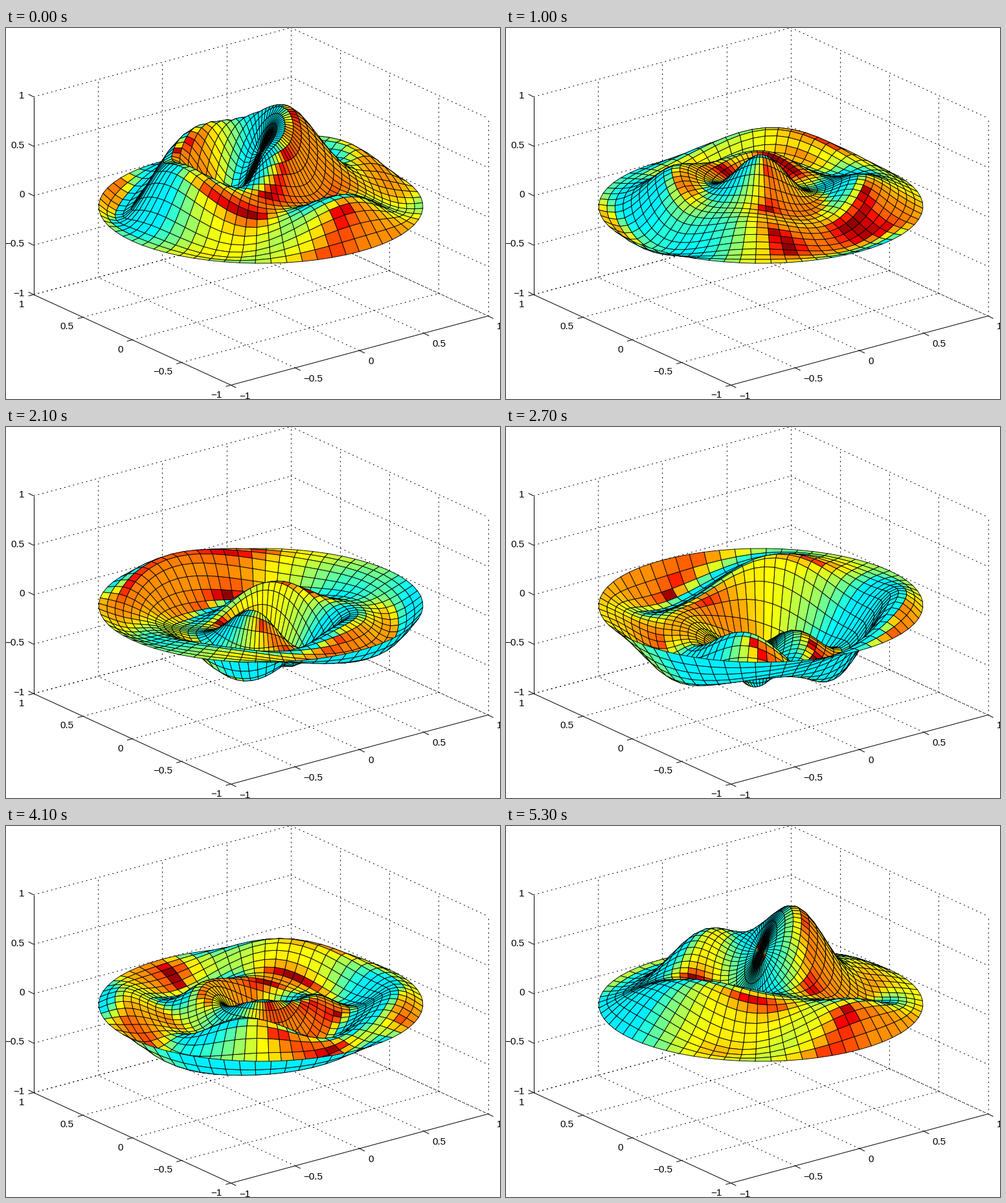
Recreate the animation shown at these times as a matplotlib script. Size 763x574 px, loop 5400 ms.

```python
import numpy as np
import matplotlib.pyplot as plt
from matplotlib.animation import FuncAnimation
from matplotlib.collections import PolyCollection

W, H, DPI = 763, 574, 64
PX = 72 / DPI                      # one pixel in points
FRAMES, STEP_MS = 54, 100
RINGS, SPOKES = 20, 64
SPIN = np.radians(37.4)            # turn of the x axis on screen

plt.rcParams["font.family"] = "Liberation Sans"

# ---------- projection ----------
ORIGIN = np.array([393.6, 276.0])
X_AXIS = np.array([198.6, -53.5])
Y_AXIS = np.array([-152.4, -70.0])
Z_AXIS = np.array([0.0, -153.0])
WIDE, DEEP = 250.4, 88.1


def project(x, y, z):
    return ORIGIN + x * X_AXIS + y * Y_AXIS + z * Z_AXIS


# ---------- drum ----------
def bessel(m, x):
    tau = (np.arange(200) + 0.5) * np.pi / 200
    return np.cos(m * tau - np.asarray(x)[..., None] * np.sin(tau)).mean(-1)


def bessel_zero(m, n):
    x = np.linspace(0.5, 20, 2000)
    y = bessel(m, x)
    i = np.flatnonzero(y[:-1] * y[1:] < 0)[n - 1]
    return x[i] - y[i] * (x[i + 1] - x[i]) / (y[i + 1] - y[i])


radius = np.linspace(0, 1, RINGS + 1)
phi = np.linspace(0, 2 * np.pi, SPOKES + 1) + SPIN
R, PHI = np.meshgrid(radius, phi, indexing="ij")
U, V = R * np.cos(PHI), R * np.sin(PHI)
BASE = bessel_zero(0, 1)           # the lowest tone swings once per loop


class Mode:
    """Standing wave: m nodal lines, n nodal circles, highest at step `peak`."""

    def __init__(self, m, n, size, facing=0, peak=0):
        zero = bessel_zero(m, n)
        turn = PHI - np.radians(facing)
        self.shape = size * bessel(m, zero * R) * np.cos(m * turn)
        self.speed = 2 * np.pi / FRAMES * zero / BASE
        self.peak = peak

    def at(self, k):
        return self.shape * np.cos(self.speed * (k - self.peak))


MODES = [
    Mode(0, 1, 0.57, peak=2),
    Mode(1, 2, 0.40, facing=55, peak=-2),
    Mode(1, 3, 0.55, facing=20),
    Mode(1, 4, 0.40, facing=90, peak=26),
    Mode(2, 3, 0.35, peak=6),
    Mode(3, 2, 0.25, facing=17),
    Mode(4, 1, 0.25, facing=-50),
]


def heights(k):
    return sum(mode.at(k) for mode in MODES)


# ---------- lighting ----------
VIEW = np.array([0, -np.sqrt(3) / 2, 0.5])
LIGHT = np.array([np.sqrt(6) / 4, -np.sqrt(6) / 4, 0.5])
AMBIENT, DIFFUSE, SPECULAR, SHINE = 0.55, 0.6, 0.4, 10


def jet64(level):
    def ramp(middle):
        return np.clip(1.5 - np.abs(level - middle) / 16, 0, 1)
    return np.stack([ramp(48), ramp(32), ramp(16)], -1)


def nice_span(z):
    """Length of a rounded axis range around the data."""
    lo, hi = z.min(), z.max()
    raw = (hi - lo) / 4
    power = 10 ** np.floor(np.log10(raw))
    step = power * min((1, 2, 5, 10), key=lambda n: abs(np.log(n * power / raw)))
    return (np.ceil(hi / step) - np.floor(lo / step + 1e-3)) * step


def shade(z):
    z = z * 2 / nice_span(z)
    zr = np.gradient(z, radius, axis=0)
    ring = np.concatenate([z[:, -2:-1], z, z[:, 1:2]], axis=1)
    zp = (ring[:, 2:] - ring[:, :-2]) / (4 * np.pi / SPOKES)
    zp = zp / np.maximum(R, radius[1] / 2)
    normal = np.stack([zp * np.sin(PHI) - zr * np.cos(PHI),
                       -zr * np.sin(PHI) - zp * np.cos(PHI),
                       np.ones_like(z)], -1)
    normal /= np.linalg.norm(normal, axis=-1, keepdims=True)
    lit, seen = normal @ LIGHT, normal @ VIEW
    gloss = np.maximum(0, 2 * lit * seen - LIGHT @ VIEW) ** SHINE
    total = AMBIENT + DIFFUSE * np.maximum(0, lit) + SPECULAR * gloss
    bright = total / (AMBIENT + DIFFUSE + SPECULAR)
    return jet64(np.clip(np.floor(bright * 64) + 1, 1, 64))


def corners(a):
    return np.stack([a[:-1, :-1], a[1:, :-1], a[1:, 1:], a[:-1, 1:]], 2)


# ---------- stage ----------
fig = plt.figure(figsize=(W / DPI, H / DPI), dpi=DPI, facecolor="white")
ax = fig.add_axes([0, 0, 1, 1])
ax.set_xlim(0, W)
ax.set_ylim(H, 0)
ax.axis("off")


def line(a, b, style="-"):
    ax.plot(*zip(a, b), color="black", lw=PX, ls=style, zorder=1,
            dash_capstyle="butt", solid_capstyle="butt")


def dots(a, b):
    line(a, b, (0, (2, 5)))


def label(x, y, value, align):
    text = f"{value:g}".replace("-", "\u2212")
    ax.text(x, y, text, fontsize=15.3 * PX, ha=align, va="center_baseline")


def draw_axes():
    for t in (-1, -0.5, 0, 0.5, 1):
        if t > -1:
            dots(project(t, 1, -1), project(t, 1, 1))
            dots(project(t, -1, -1), project(t, 1, -1))
            dots(project(-1, t, -1), project(1, t, -1))
        if t < 1:
            dots(project(1, t, -1), project(1, t, 1))
        dots(project(-1, 1, t), project(1, 1, t))
        dots(project(1, 1, t), project(1, -1, t))

        p = project(t, -1, -1)
        line(p, p + (8, 4))
        label(p[0] + 13, p[1] + 15.5, t, "left")
        p = project(-1, t, -1)
        line(p, p + (-8, 2))
        label(p[0] - 14, p[1] + 13.5, t, "right")
        p = project(-1, 1, t)
        line(p, p + (-8, -4))
        label(p[0] - 14, p[1] - 3, t, "right")
    line(project(-1, 1, -1), project(-1, 1, 1))
    line(project(-1, 1, -1), project(-1, -1, -1))
    line(project(-1, -1, -1), project(1, -1, -1))


draw_axes()
mesh = PolyCollection([], edgecolors="black", linewidths=PX * 0.9, zorder=2)
ax.add_collection(mesh, autolim=False)


def update(k):
    z = heights(k)
    sx = ORIGIN[0] + WIDE * U
    sy = ORIGIN[1] - DEEP * V + Z_AXIS[1] * z
    quads = np.stack([corners(sx), corners(sy)], -1).reshape(-1, 4, 2)
    depth = corners(V * np.sqrt(3) / 2 - z / 2).mean(2).ravel()
    order = np.argsort(-depth)
    mesh.set_verts(quads[order])
    mesh.set_facecolor(shade(z)[:-1, :-1].reshape(-1, 3)[order])
    return [mesh]


anim = FuncAnimation(fig, update, frames=FRAMES, interval=STEP_MS,
                     repeat=True, repeat_delay=0, blit=False)
plt.show()
```
